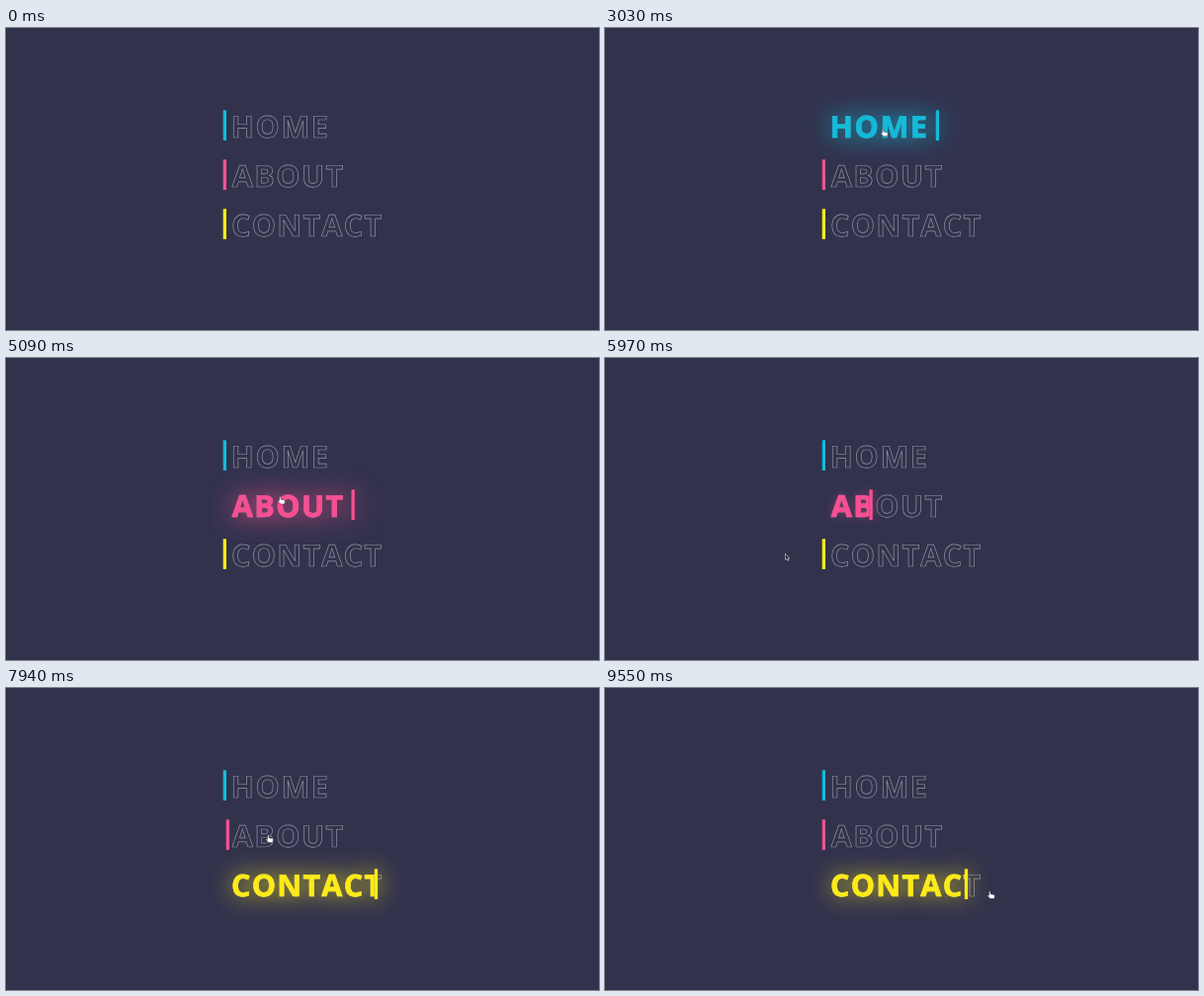
These frames come from a looping animation (600x306 px, 10000 ms). An HTML page:

```html
<!DOCTYPE html>
<html lang="en">
<head>
<meta charset="utf-8">
<title>Menu hover</title>
<style>
  html, body { margin: 0; width: 100%; height: 100%; overflow: hidden; background: #32324d; }
  svg { display: block; width: 100vw; height: 100vh; }
  text {
    font: 700 30.5px "Noto Sans", "Open Sans", sans-serif;
    font-kerning: none;
    text-rendering: geometricPrecision;
  }
  .outline { fill: none; stroke: #fff; stroke-opacity: .5; stroke-width: .65; }
</style>
</head>
<body>
<svg id="stage" viewBox="0 0 600 306" xmlns="http://www.w3.org/2000/svg"></svg>
<script>
const LOOP = 10000, FADE = 1000, GLOW = 13;
const LEFT = 219.7, TOP = 83.3, PITCH = 50, BAR_W = 3.3, BAR_H = 30.7;
const stage = document.getElementById('stage');

const items = [
  { label: 'HOME', color: '#12bbda', width: 115, x: 227.4, gap: 1.7 },
  { label: 'ABOUT', color: '#f74f92', width: 130, x: 228.7, gap: 1.5 },
  { label: 'CONTACT', color: '#fdea18', width: 170, x: 228, gap: 1.3 }
];
items.forEach((item, i) => item.top = TOP + PITCH * i);

// Two takes of the pointer: its path as [time, x, y], shown from `from` to `to`
const takes = [
  { from: 0, to: 8820, path: [
    [1180, 14, 196], [1680, 220, 112], [1970, 253, 101], [2790, 270, 103],
    [2940, 270, 103], [3230, 335, 98], [3500, 394, 104], [3910, 386, 130.5],
    [4150, 349, 141], [5000, 277, 140], [5090, 277, 140], [5600, 220, 160],
    [5850, 180, 196], [6460, 220, 204], [6820, 285, 202], [7500, 310, 198],
    [7830, 277, 184], [7940, 265, 149], [8060, 266, 99], [8820, 276, 98]
  ] },
  { from: 9330, to: 9550, path: [[9000, 310, 195], [9550, 389, 205.5]] }
];

function add(parent, tag, attrs, text) {
  const el = document.createElementNS(stage.namespaceURI, tag);
  for (const key in attrs) el.setAttribute(key, attrs[key]);
  if (text) el.textContent = text;
  parent.appendChild(el);
  return el;
}

// CSS "ease": cubic-bezier(.25, .1, .25, 1)
function ease(t) {
  if (t <= 0) return 0;
  if (t >= 1) return 1;
  const bez = (a, b, u) => 3 * a * u * (1 - u) ** 2 + 3 * b * u * u * (1 - u) + u ** 3;
  let lo = 0, hi = 1;
  for (let i = 0; i < 24; i++) {
    const mid = (lo + hi) / 2;
    if (bez(.25, .25, mid) < t) lo = mid; else hi = mid;
  }
  return bez(.1, 1, lo);
}

const slope = (a, b, axis) => (b[axis] - a[axis]) / (b[0] - a[0]);

// Harmonic-mean tangents keep the curve from overshooting its points
function tangent(path, i, axis) {
  const last = path.length - 1;
  if (i === 0) return slope(path[0], path[1], axis);
  if (i === last) return slope(path[last - 1], path[last], axis);
  const a = slope(path[i - 1], path[i], axis), b = slope(path[i], path[i + 1], axis);
  return a * b > 0 ? 2 * a * b / (a + b) : 0;
}

function pointAt(path, time) {
  let i = 0;
  while (i < path.length - 2 && time >= path[i + 1][0]) i++;
  const span = path[i + 1][0] - path[i][0];
  const u = Math.min(1, Math.max(0, (time - path[i][0]) / span));
  return [1, 2].map(axis => {
    const a = path[i][axis], b = path[i + 1][axis];
    return a + (b - a) * u * u * (3 - 2 * u) + span * (
      tangent(path, i, axis) * u * (1 - u) ** 2 -
      tangent(path, i + 1, axis) * u * u * (1 - u));
  });
}

const isOver = ({ top, width }, [x, y]) =>
  x >= LEFT && x <= LEFT + width && y >= top && y <= top + BAR_H;

// Times at which the pointer enters or leaves an item, alternating
function crossings(path, item) {
  const times = [];
  for (let t = path[0][0]; t <= path[path.length - 1][0]; t += 2) {
    if (isOver(item, pointAt(path, t)) !== (times.length % 2 === 1)) times.push(t);
  }
  return times;
}
for (const take of takes) take.hovers = items.map(item => crossings(take.path, item));

// Each transition starts where the last one was cut off and is shortened to match
function progress(times, now) {
  let p = 0;
  times.forEach((start, i) => {
    if (now <= start) return;
    const end = Math.min(now, times[i + 1] || now);
    const step = (i % 2 ? 0 : 1) - p;
    if (step) p += step * ease((end - start) / (FADE * Math.abs(step)));
  });
  return p;
}

const defs = add(stage, 'defs', {});
items.forEach((item, i) => {
  const { label, color, top, x, gap } = item;
  const place = { x, y: top + 27.2, 'letter-spacing': gap };
  const filter = add(defs, 'filter', {
    id: 'glow' + i, filterUnits: 'userSpaceOnUse', x: 120, y: top - 70,
    width: 380, height: 170, 'color-interpolation-filters': 'sRGB'
  });
  item.shadow = add(filter, 'feDropShadow', { dx: 0, dy: 0, 'flood-color': color });
  const clip = add(defs, 'clipPath', { id: 'clip' + i });
  item.clip = add(clip, 'rect', { x: LEFT, y: top, width: 0, height: BAR_H });

  add(stage, 'text', { ...place, class: 'outline' }, label);
  item.group = add(stage, 'g', { fill: color });
  const cut = add(item.group, 'g', { 'clip-path': `url(#clip${i})` });
  add(cut, 'text', { ...place, stroke: color, 'stroke-width': .65 }, label);
  item.bar = add(item.group, 'rect', { x: LEFT, y: top, width: BAR_W, height: BAR_H });
});

const arrow = add(stage, 'path', {
  d: 'M.2 -.4V5.8L1.6 4.6 2.6 6.8 3.6 6.4 2.7 4.3H4.6Z',
  fill: '#222230', stroke: '#dedee4', 'stroke-width': .6
});
const hand = add(stage, 'path', {
  d: 'M-.6 .6Q.1 -.1 .8 .6L1.2 3.2 4.6 3.9Q5.5 4.2 5.4 5.2L4.8 8H.8L-2 4.9Q-1.6 4 -.3 4.6Z',
  fill: '#fff', stroke: '#22222f', 'stroke-width': .5
});

function draw(ms) {
  const take = ms < takes[1].from ? takes[0] : takes[1];
  const time = Math.min(ms, take.to);

  items.forEach(({ width, clip, bar, group, shadow }, i) => {
    const p = progress(take.hovers[i], time);
    clip.setAttribute('width', width * p);
    bar.setAttribute('x', LEFT + width * p);
    if (p > .005) {
      shadow.setAttribute('stdDeviation', GLOW * p);
      shadow.setAttribute('flood-opacity', p);
      group.setAttribute('filter', `url(#glow${i})`);
    } else {
      group.removeAttribute('filter');
    }
  });

  const point = pointAt(take.path, time);
  const over = items.some(item => isOver(item, point));
  const shown = time >= take.path[0][0];
  for (const [el, on] of [[hand, over], [arrow, !over]]) {
    el.setAttribute('visibility', shown && on ? 'visible' : 'hidden');
    el.setAttribute('transform', `translate(${point})`);
  }
}

const begin = performance.now();
function tick() {
  draw((performance.now() - begin) % LOOP);
  requestAnimationFrame(tick);
}
draw(0);
requestAnimationFrame(tick);
</script>
</body>
</html>
```
